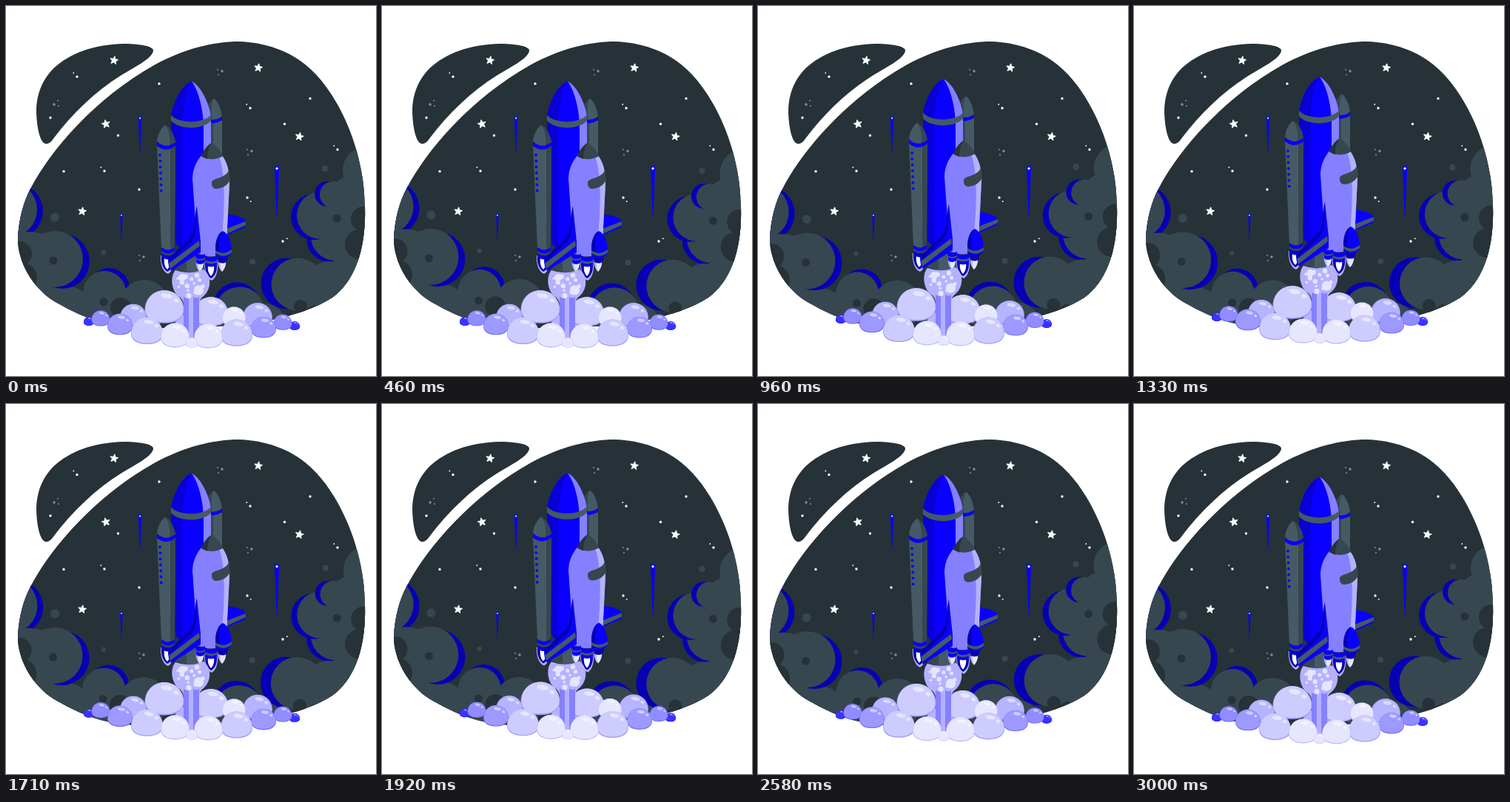
Animation, 500 px wide and 500 px high, one loop 3040 ms. Source, as an HTML page:

```html
<!DOCTYPE html>
<html lang="en">
<head>
<meta charset="utf-8">
<title>Rocket launch</title>
<style>
  html, body { margin: 0; width: 100%; height: 100%; overflow: hidden; background: #fff; }
  svg { display: block; width: 100vw; height: 100vh; }
  .blue { fill: #0a00ff; }
  .navy { fill: #0700b3; }
  .deep { fill: #0800d4; }
  .lilac { fill: #8580ff; }
  .pale { fill: #b5b1ff; }
  .mist { fill: #e6e5ff; }
  .grey { fill: #455a64; }
  .slate { fill: #37474f; }
  .night { fill: #263238; }
  .white { fill: #fff; }
</style>
</head>
<body>
<svg viewBox="0 0 500 500">
  <defs>
    <path id="sky" d="M485 270C487 330 471 372 441 394C420 408 390 418 360 424C300 436 200 438 150 432C112 425 88 412 65 399C35 380 16 345 16 315C17 288 24 264 33 247C60 195 120 125 200 80C240 58 280 48 315 48C350 49 385 61 409 83C447 116 484 190 485 270Z"/>
    <clipPath id="skyClip"><use href="#sky"/></clipPath>
    <path id="star" class="white" stroke="#fff" stroke-width=".8" stroke-linejoin="round" d="M0-5.8L1.6-2L5.5-1.8L2.5 .8L3.4 4.7L0 2.6L-3.4 4.7L-2.5 .8L-5.5-1.8L-1.6-2Z"/>
    <circle id="dot" class="white" r="1.7"/>
    <g id="pair"><use href="#dot"/><circle class="white" cx="-4.7" cy="-5" r=".9"/></g>
    <g id="trio" class="white" opacity=".45">
      <circle cx="3" cy="-1" r="1.7"/><circle cx="-3" cy="-3" r="1"/><circle cx="-2" cy="4" r="1"/>
    </g>
    <g id="trail">
      <path class="blue" d="M-3 3A3 3 0 0 1 3 3L.4 69H-.4Z"/>
      <circle class="white" cy="3.6" r="1.6"/>
    </g>
    <g id="flame">
      <path class="mist" d="M-5-8H5C6 0 4 6 0 10C-4 6-6 0-5-8Z"/>
      <path class="pale" d="M-5-8H-2C-3 0-2 6 0 10C-4 6-6 0-5-8Z"/>
    </g>
    <g id="jet">
      <path class="pale" d="M-9-11H9C10 0 7 11 1 14C-6 12-10 0-9-11Z"/>
      <path class="navy" d="M-8-12H8C9 0 6 8 0 11C-6 7-9-1-8-12Z"/>
      <path class="white" d="M-4-7Q0-4 4-7C5 0 3 5 0 8C-3 5-5 0-4-7Z"/>
    </g>
  </defs>

  <use href="#sky" class="night"/>
  <path class="night" d="M53 186C45 184 41 160 41 140C42 112 54 91 73 77C99 58 130 51 165 51C186 52 199 55 199 60C199 70 175 82 155 94C120 116 90 145 65 178C61 184 57 187 53 186Z"/>
  <g id="stars"></g>
  <g clip-path="url(#skyClip)"><g id="clouds"></g></g>

  <g id="float">
    <!-- right booster -->
    <path class="grey" d="M272 155H292V284L276 292Z"/>
    <path class="slate" d="M272 155H280V290H272Z"/>
    <path class="grey" d="M281 125C275 128 270 139 269 151Q281 159 292 150C291 139 286 128 281 125Z"/>
    <path class="slate" d="M281 125C275 128 270 139 269 151L278 153C277 140 278 131 281 125Z"/>
    <path class="blue" d="M269 151Q282 157 292 149V154Q282 161 269 157Z"/>

    <!-- main tank -->
    <path class="grey" d="M226 332H267V357Q248 364 229 355Z"/>
    <path class="slate" d="M226 332H244V359Q235 358 229 355Z"/>
    <path class="blue" d="M250 102C236 108 225 133 223 149L229 320Q240 338 270 330L277 149C275 133 264 108 250 102Z"/>
    <path class="deep" d="M250 102C236 108 225 133 223 149L229 320L238 328V157C239 134 243 114 250 102Z"/>
    <path class="lilac" d="M251 102C264 108 275 133 277 149V250H267V160C266 136 259 112 251 102Z"/>
    <path class="grey" d="M223 147C232 159 266 160 277 147V155C266 168 233 167 223 155Z"/>

    <!-- left booster -->
    <use href="#jet" x="218" y="348"/>
    <path class="grey" d="M204 187L210 328Q219 335 228 328L229 187Z"/>
    <path class="slate" d="M222 190L229 188L228 328L222 331Z"/>
    <path class="grey" d="M215 161C209 165 204 175 204 185Q216 195 229 185C228 175 222 165 215 161Z"/>
    <path class="slate" d="M215 161C222 165 228 175 229 185L221 189C222 176 220 168 215 161Z"/>
    <path class="blue" d="M204 183Q216 194 229 184V189Q216 199 204 189Z"/>
    <path class="blue" d="M210 326Q219 333 228 326V331Q219 338 210 331Z"/>
    <path class="slate" d="M210 331Q219 338 228 331V334Q219 341 210 334Z"/>
    <path class="deep" d="M210 334Q219 341 228 334L227 339Q219 345 210 339Z"/>
    <g id="rivets"></g>

    <!-- right wing -->
    <path class="blue" d="M300 282Q310 281 322 288Q326 292 323 299L298 310Z"/>
    <path class="grey" d="M324 291V296L298 308V301Z"/>

    <!-- engines -->
    <use href="#flame" x="262" y="349"/>
    <use href="#flame" x="292" y="349"/>
    <use href="#jet" x="277" y="357"/>

    <!-- orbiter -->
    <path class="lilac" d="M264 202C256 212 252 222 252 234L259 332Q270 344 297 334L302 240C303 224 298 210 292 202Z"/>
    <path class="pale" d="M292 202C298 210 303 224 302 240L298 320H291C295 285 298 230 288 203Z"/>
    <path class="slate" d="M278 185C272 188 267 195 264 203Q278 211 293 203C290 195 284 188 278 185Z"/>
    <path class="night" d="M278 185C272 188 267 195 264 203L272 207C272 197 274 190 278 185Z"/>
    <path class="slate" d="M278 240C277 234 285 234 291 231C298 228 301 224 301 220L303 235C300 242 292 247 284 247C280 247 278 244 278 240Z"/>

    <!-- left wing and fin -->
    <path class="blue" d="M258 271C255 290 258 304 248 315L219 343Q219 353 223 358L263 333V318Z"/>
    <path class="grey" d="M220 348L261 317L262 324L222 355Z"/>
    <path class="navy" d="M258 270C253 290 258 304 246 315L219 342L221 347L250 319C260 307 257 290 258 270Z"/>

    <!-- pod and nozzles -->
    <path class="blue" d="M293 304C287 307 283 316 283 329V337Q294 344 304 336L305 329C304 317 300 307 293 304Z"/>
    <path class="navy" d="M293 304C287 307 283 316 283 329V337L289 339C287 323 288 311 293 304Z"/>
    <path class="grey" d="M283 330Q294 338 305 329V333Q294 342 283 334Z"/>
    <path class="navy" d="M286 339Q293 342 300 338L298 346Q293 349 287 346Z"/>
    <path class="blue" d="M256 334Q262 338 269 335L268 347Q262 351 257 347Z"/>
    <path class="grey" d="M256 340Q262 344 269 340V342Q262 346 256 342Z"/>
    <path class="blue" d="M269 337Q277 342 286 337L285 350Q277 355 270 350Z"/>
    <path class="grey" d="M269 343Q277 348 286 343V346Q277 351 269 346Z"/>

    <g id="smokeBack"></g>
    <path class="pale" d="M229 357Q248 364 267 356C280 366 276 385 267 392Q261 396 261 404V452H240V404Q240 396 233 392C224 385 221 366 229 357Z"/>
    <path class="lilac" d="M240 393Q244 396 247 393V452H240ZM253 393Q258 396 261 393V452H253Z"/>
    <g id="bubbles"></g>
    <g id="smokeFront"></g>
  </g>
</svg>
<script>
  const el = id => document.getElementById(id);
  const range = n => [...Array(n).keys()];
  const circle = (x, y, r, cls) => `<circle class="${cls}" cx="${x}" cy="${y}" r="${r}"/>`;
  const put = (id, points) => points.map(([x, y, turn = 0, size = 1]) =>
    `<use href="#${id}" transform="translate(${x} ${y}) rotate(${turn}) scale(${size})"/>`).join('');

  el('stars').innerHTML =
    put('star', [[146, 73.5, 10], [341, 83.5, 8], [135, 159.5, -12], [396.5, 176.5, 12], [103, 277.5, 8]])
    + put('pair', [[96, 95.5], [133, 223], [330, 138], [448, 194], [326, 259, 180], [374, 318, 100]])
    + put('dot', [[60, 151], [207, 105], [151.5, 175], [78, 223.5], [180, 248], [376.5, 159.5], [411, 125]])
    + put('trio', [[68, 132, 180], [289, 89], [329, 197], [183, 340]])
    + put('trail', [[181, 149, 0, .7], [156, 281, 0, .54], [366, 216]]);

  // Dark clouds, back to front; a lit cloud shows a rim shifted by (dx, dy)
  const cloud = (x, y, r) => circle(x, y, r, 'slate');
  const lit = (x, y, r, dx, dy) => circle(x + dx, y + dy, r - 1, 'navy') + cloud(x, y, r);
  const hollow = (x, y, r) => circle(x, y, r, 'night');
  el('clouds').innerHTML = [
    // left bank
    lit(4, 275, 38, 9, 2), cloud(32, 355, 50), cloud(80, 418, 40),
    lit(66, 342, 38, 10, 3), lit(133, 387, 29, 6, -5), cloud(187, 403, 33), cloud(130, 418, 34),
    hollow(18, 335, 17), hollow(22, 367, 20), hollow(64, 344, 5.5), hollow(132, 400, 5.5), hollow(155, 408, 14),
    // right bank
    cloud(487, 222, 32), lit(445, 311, 33, -7, 3), lit(425, 283, 32, -9, 2), cloud(472, 265, 37),
    lit(442, 255, 18, -8, -1), cloud(478, 310, 32), cloud(437, 378, 33), cloud(465, 375, 38),
    lit(394, 376, 35.5, -15, -1), lit(316, 413, 33.5, -4, -7), cloud(350, 430, 28),
    hollow(447, 287, 5.5), hollow(483, 288, 17), hollow(478, 322, 20), hollow(398, 406, 9),
    // loose puffs
    cloud(66, 285.5, 6), cloud(132, 333, 3.2), cloud(431, 219.7, 4.3), cloud(333, 345.5, 4)
  ].join('').replaceAll('undefined', '');

  el('rivets').innerHTML = range(7).map(i => circle(208 + i * .3, 201.5 + i * 8, 1.9, 'blue')).join('');

  // Exhaust bubbles: three large ones, the rest on a golden-angle spiral
  el('bubbles').innerHTML = circle(238, 367, 5, 'mist') + circle(260.5, 384, 6.6, 'mist') + circle(247, 391.5, 3.6, 'mist')
    + range(13).map(i => {
      const d = 21 * Math.sqrt((i + .5) / 13), a = i * 2.4;
      return circle(250 + d * Math.cos(a), 375 + .65 * d * Math.sin(a), 1.8 + i * 5 % 3 * .7, 'mist');
    }).join('');

  // Smoke balls; tint 0 is blue, 1 is white
  const tint = k => `rgb(${[10, 0, 255].map(c => Math.round(c + (255 - c) * k))})`;
  const dome = (k, dy, size) => `<path fill="${tint(k)}" transform="translate(0 ${dy}) scale(${size})"`
    + ' d="M-1 .2C-1-.5-.55-1 0-1S1-.5 1 .2C1 .75 .55 1 0 1S-1 .75-1 .2Z"/>';
  const shine = (x, y, a, b, turn) =>
    `<ellipse rx="${a}" ry="${b}" fill="#fff" opacity=".5" transform="translate(${x} ${y}) rotate(${turn})"/>`;
  const ball = (x, y, r, k) => `<g transform="translate(${x} ${y}) scale(${r} ${r * .84})">`
    + dome(k - .18, 0, 1) + dome(k, -.04, .965)
    + shine(.12, -.66, .3, .15, 12) + shine(.6, -.38, .14, .11, 45) + '</g>';
  // The right half mirrors the left and sags towards its end
  const mirrored = (dx, y, r, k) => ball(251 - dx, y, r, k) + ball(251 + dx, y + dx / 23, r, k);

  el('smokeBack').innerHTML = ball(250, 435, 24, .7)
    + ball(172, 418, 18, .7) + ball(340, 418, 20, .7) + ball(277, 413, 23.5, .8)
    + ball(308, 420, 16, .9) + ball(214, 406.5, 26.5, .8);
  el('smokeFront').innerHTML = mirrored(139, 426, 7, .2) + mirrored(123, 422, 12.5, .55)
    + mirrored(97, 430, 17, .6) + mirrored(60.5, 439, 21.5, .8)
    + mirrored(22.5, 445, 19.5, .9) + ball(251, 455, 8, .9);

  // Motion
  const LOOP = 3040, BOB = 3500, SWAY = 1500;
  const ease = p => (1 - Math.cos(Math.PI * p)) / 2;
  const clouds = el('clouds'), float = el('float');
  const start = performance.now();

  function sway(p) {
    if (p < .25) return ease(p * 4);
    if (p < .75) return 1 - 2 * ease((p - .25) * 2);
    return ease((p - .75) * 4) - 1;
  }
  function draw(now) {
    const t = Math.max(0, now - start) % LOOP;
    const rise = .4 - 9 * ease((t - 230) * 2 / BOB);
    float.setAttribute('transform', `translate(0 ${rise.toFixed(3)})`);
    clouds.setAttribute('transform', `rotate(${sway(t % SWAY / SWAY).toFixed(4)} 251 307)`);
    requestAnimationFrame(draw);
  }
  draw(start);
</script>
</body>
</html>
```
